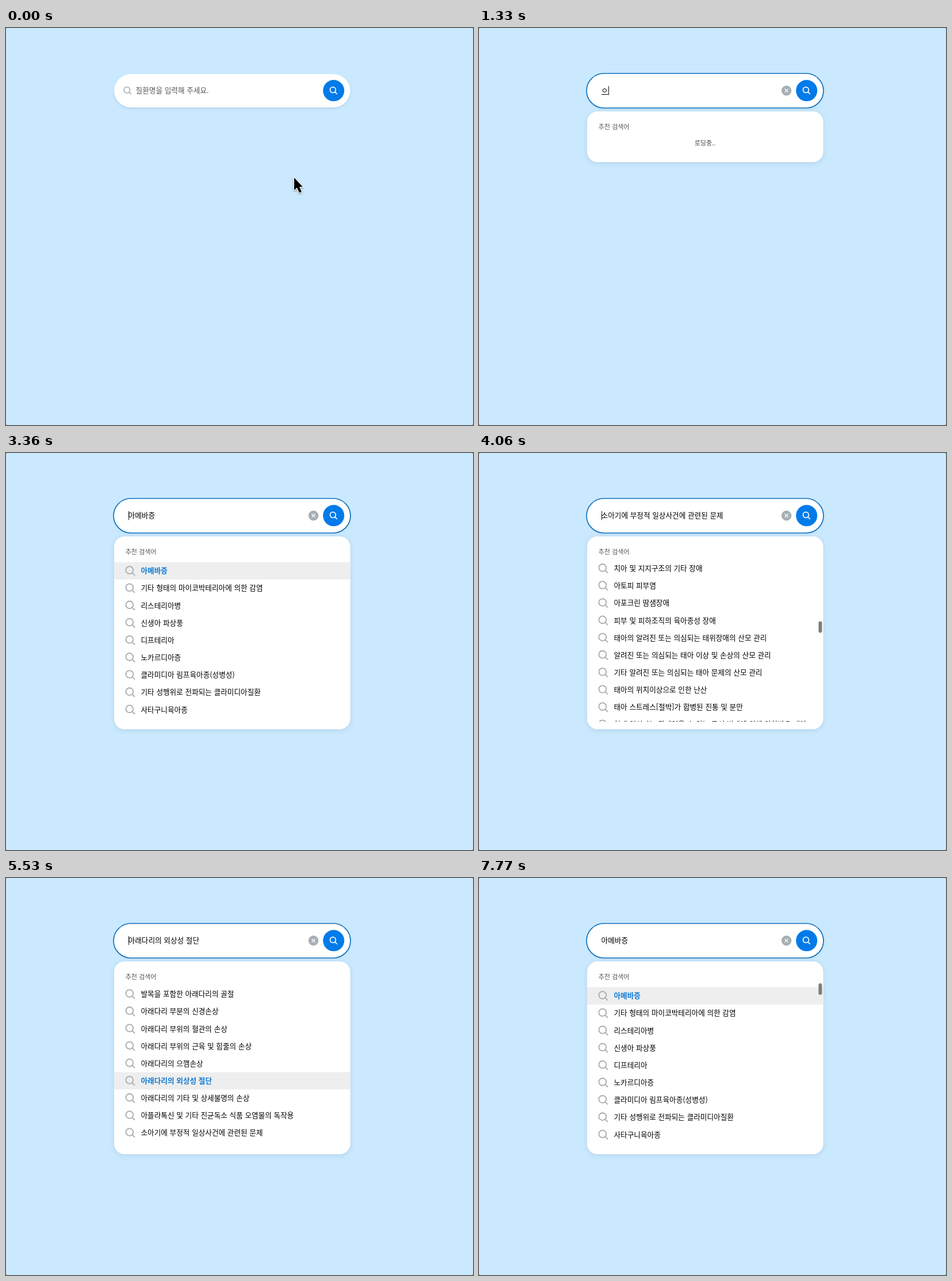
Animation of 812 by 690 pixels, one loop 8 s. Source, as an HTML page with a canvas:

```html
<!DOCTYPE html>
<html lang="ko">
<head>
<meta charset="utf-8">
<title>질환 검색</title>
<style>
  html, body { margin: 0; width: 100%; height: 100%; overflow: hidden; background: #cae9ff; }
  canvas { display: block; }
</style>
</head>
<body>
<canvas id="stage" width="812" height="690"></canvas>
<script>
const ctx = document.getElementById('stage').getContext('2d');
const LOOP = 8000, STEP = 70;
const FAMILY = '"Noto Sans CJK KR", "Noto Sans CJK", sans-serif';
const SIZE = 12.63;

// Suggestion list
const ROWS = 115, PITCH = 30.15, FIRST_Y = 204.6;
const LIST_TOP = 181.2, LIST_BOTTOM = 467;
const MAX_SCROLL = PITCH * (ROWS - 1) - 238.1;

const filler = [
  '소아마비의 후유증', '아데노바이러스뇌염', '아스페르길루스증', '말라리아', '트리코모나스아메바증',
  '소아기 및 청소년기의 행동장애', '아급성 갑상선염', '태아 알코올증후군', '치아우식', '치아의 발육 및 맹출 장애',
  '아밀로이드증', '아나필락시스쇼크', '신생아 호흡곤란', '아편유사제의 중독', '신생아의 감염성 질환',
  '소아기의 정서장애', '신생아 황달', '태아의 성장지연', '아래턱의 골절'
];
const known = {
  0: ['아메바증', '기타 형태의 마이코박테리아에 의한 감염', '리스테리아병', '신생아 파상풍', '디프테리아',
      '노카르디아증', '클라미디아 림프육아종(성병성)', '기타 성행위로 전파되는 클라미디아질환', '사타구니육아종'],
  44: ['치아 및 지지구조의 기타 장애', '아토피 피부염', '아포크린 땀샘장애', '피부 및 피하조직의 육아종성 장애',
       '태아의 알려진 또는 의심되는 태위장애의 산모 관리', '알려진 또는 의심되는 태아 이상 및 손상의 산모 관리',
       '기타 알려진 또는 의심되는 태아 문제의 산모 관리', '태아의 위치이상으로 인한 난산',
       '태아 스트레스[절박]가 합병된 진통 및 분만', '현재 임신과는 관계없을 수 있는 모성 병태에 의해 영향받은 태아'],
  95: ['표재성 손상', '열린 상처', '골절', '부위의 신경의 손상', '부위의 혈관의 손상', '부위의 근육 및 힘줄의 손상',
       '으깸손상', '외상성 절단', '기타 및 상세불명의 손상']
      .map(s => (s.startsWith('부위') ? '아래팔 ' : '아래팔의 ') + s),
  104: ['아래다리의 표재성 손상', '아래다리의 열린 상처', '발목을 포함한 아래다리의 골절', '아래다리 부분의 신경손상',
        '아래다리 부위의 혈관의 손상', '아래다리 부위의 근육 및 힘줄의 손상', '아래다리의 으깸손상',
        '아래다리의 외상성 절단', '아래다리의 기타 및 상세불명의 손상',
        '아플라톡신 및 기타 진균독소 식품 오염물의 독작용', '소아기에 부정적 일상사건에 관련된 문제']
};
const items = Array.from({ length: ROWS }, (_, i) => filler[i * 7 % filler.length]);
for (const start in known) known[start].forEach((s, i) => { items[+start + i] = s; });

// Key presses: time, selected row, direction
const keys = [
  [2520, 0, 'down'], [2940, 1, 'down'], [3360, 0, 'up'], [3710, 114, 'up'], [4760, 113, 'up'],
  [5110, 112, 'up'], [5530, 111, 'up'], [5950, 112, 'down'], [6300, 113, 'down'],
  [6650, 114, 'down'], [7000, 0, 'down']
];
const FOCUS = 630, TYPE = 1330, COMPOSE = 1470, LOADED = 1960;

const clamp = v => Math.min(1, Math.max(0, v));

// cubic-bezier(.42, 0, .58, 1)
function easeInOut(x) {
  x = clamp(x);
  let lo = 0, hi = 1;
  for (let i = 0; i < 40; i++) {
    const s = (lo + hi) / 2, r = 1 - s;
    const bx = 1.26 * r * r * s + 1.74 * r * s * s + s * s * s;
    if (bx < x) lo = s; else hi = s;
  }
  return lo * lo * (3 - 2 * lo);
}

function scrollPart(t) {
  return t < 6900 ? easeInOut((t - 3721.76) / 750) : 1 - easeInOut((t - 6977.06) / 750);
}

function label(s, x, cy, { size = SIZE, weight = 500, color = '#000', align = 'left' } = {}) {
  ctx.font = `${weight} ${size}px ${FAMILY}`;
  ctx.wordSpacing = size * 0.066 + 'px';
  ctx.textAlign = align;
  ctx.fillStyle = color;
  ctx.fillText(s, x, cy + size * 0.375);
  return ctx.measureText(s).width;
}

function box(x, y, w, h, r, color) {
  ctx.beginPath();
  ctx.roundRect(x, y, w, h, r);
  ctx.fillStyle = color;
  ctx.fill();
}

function disc(x, y, r, color) {
  ctx.beginPath();
  ctx.arc(x, y, r, 0, 7);
  ctx.fillStyle = color;
  ctx.fill();
}

function shadowBox(x, y, w, h, r, dy, blur, alpha) {
  ctx.save();
  ctx.shadowColor = `rgba(30,32,37,${alpha})`;
  ctx.shadowOffsetY = dy;
  ctx.shadowBlur = blur;
  box(x, y, w, h, r, '#fff');
  ctx.restore();
}

function line(color, width, ...pts) {
  ctx.beginPath();
  pts.forEach(([x, y], i) => i % 2 ? ctx.lineTo(x, y) : ctx.moveTo(x, y));
  ctx.strokeStyle = color;
  ctx.lineWidth = width;
  ctx.stroke();
}

function lens(x, y, r, width, color, tail) {
  ctx.beginPath();
  ctx.arc(x, y, r, 0, 7);
  ctx.strokeStyle = color;
  ctx.lineWidth = width;
  ctx.stroke();
  const d = r * 0.707;
  line(color, width, [x + d, y + d], [x + tail, y + tail]);
}

function searchBar(t, key) {
  const focused = t >= FOCUS;
  shadowBox(188, 80, 410.5, 58, 29, 2, 4, 0.1);
  if (focused) {
    ctx.beginPath();
    ctx.roundRect(187, 79, 412, 60, 30);
    ctx.fillStyle = '#fff';
    ctx.fill();
    ctx.strokeStyle = '#1272bd';
    ctx.lineWidth = 1.7;
    ctx.stroke();
  } else {
    lens(210.3, 107.8, 5.3, 1.5, '#a3a8ac', 7.3);
  }
  disc(569.7, 108.8, 18.5, '#007be9');
  lens(568.4, 107.6, 4.9, 1.7, '#fff', 7.4);

  let width = 0;
  if (t < TYPE) {
    label('질환명을 입력해 주세요.', focused ? 212.6 : 225.6, 108, { weight: 400, color: '#555' });
  } else {
    disc(534.6, 108.8, 8.7, '#a7afb4');
    line('#fff', 1.3, [531.6, 105.8], [537.6, 111.8], [537.6, 105.8], [531.6, 111.8]);
    const value = key ? items[key[1]] : t < COMPOSE ? 'ㅇ' : '아';
    width = label(value, 212.6, 108);
    if (!key) line('#000', 1, [213, 115.5], [224.5, 115.5]);
  }
  if (focused) {
    const since = key ? key[0] : t >= COMPOSE ? COMPOSE : t >= TYPE ? TYPE : FOCUS;
    const x = key && key[2] === 'up' ? 213 : 213 + Math.round(width);
    if ((t - since) % 1000 < 500) line('#111', 1, [x + 0.5, 101], [x + 0.5, 116.5]);
  }
}

function list(t, key) {
  const part = scrollPart(t), top = part * MAX_SCROLL;
  ctx.save();
  ctx.beginPath();
  ctx.rect(188, LIST_TOP, 410.5, LIST_BOTTOM - LIST_TOP);
  ctx.clip();
  items.forEach((name, i) => {
    const y = FIRST_Y + i * PITCH - top;
    if (y < LIST_TOP - 20 || y > LIST_BOTTOM + 20) return;
    const on = key && key[1] === i;
    if (on) {
      ctx.fillStyle = '#eee';
      ctx.fillRect(188, y - 14.8, 410.5, PITCH);
    }
    lens(214.8, y - 1, 6.4, 1.8, '#a5abb0', 9.2);
    label(name, 234.5, y, on ? { weight: 700, color: '#0f7bd5' } : {});
  });
  ctx.restore();

  let alpha = 0;
  if (t >= 7000) alpha = 1;
  else if (t >= 3710) alpha = 1 - clamp((t - 5040) / 280);
  if (alpha) {
    ctx.globalAlpha = alpha;
    box(590.4, 183 + part * 263, 6, 20, 3, '#7d7d7d');
    ctx.globalAlpha = 1;
  }
}

function panel(t, key) {
  if (t < FOCUS) return;
  const bottom = t < TYPE ? 581 : t < LOADED ? 233 : 480;
  shadowBox(188, 145, 410.5, bottom - 145, 18, 2, 10, 0.1);
  label('추천 검색어', 207.7, 172, { size: 11, weight: 400, color: '#50575e' });
  if (t >= LOADED) list(t, key);
  else if (t >= TYPE) label('로딩중..', 393, 199.5, { size: 11, weight: 400, color: '#444', align: 'center' });
}

function pointer(t) {
  if (t >= TYPE) return;
  const p = easeInOut(t / 280);
  const x = 501 - 48.5 * p, y = 260 - 148 * p;
  ctx.save();
  ctx.translate(x, y);
  ctx.lineJoin = 'round';
  if (y < 138) {
    const beam = [[0, -8], [0, 8], [0, -8], [-3, -10], [0, -8], [3, -10], [0, 8], [-3, 10], [0, 8], [3, 10]];
    line('#fff', 3, ...beam);
    line('#000', 1.3, ...beam);
  } else {
    const shape = new Path2D('M0 0V22L5 17.5L9 26.5L13 24.8L9.2 16H15Z');
    ctx.shadowColor = 'rgba(0,0,0,.35)';
    ctx.shadowBlur = 3;
    ctx.shadowOffsetY = 1.5;
    ctx.strokeStyle = '#fff';
    ctx.lineWidth = 2.6;
    ctx.stroke(shape);
    ctx.shadowColor = 'transparent';
    ctx.fillStyle = '#000';
    ctx.fill(shape);
  }
  ctx.restore();
}

function draw(t) {
  ctx.fillStyle = '#cae9ff';
  ctx.fillRect(0, 0, 812, 690);
  ctx.fillStyle = '#56636d';
  for (const x of [0, 811]) for (const y of [0, 689]) ctx.fillRect(x, y, 1, 1);
  const key = keys.filter(k => k[0] <= t).pop();
  panel(t, key);
  searchBar(t, key);
  pointer(t);
}

const begin = performance.now();
function tick() {
  const t = (performance.now() - begin) % LOOP;
  draw(Math.floor(t / STEP) * STEP);
  requestAnimationFrame(tick);
}
tick();
</script>
</body>
</html>
```
